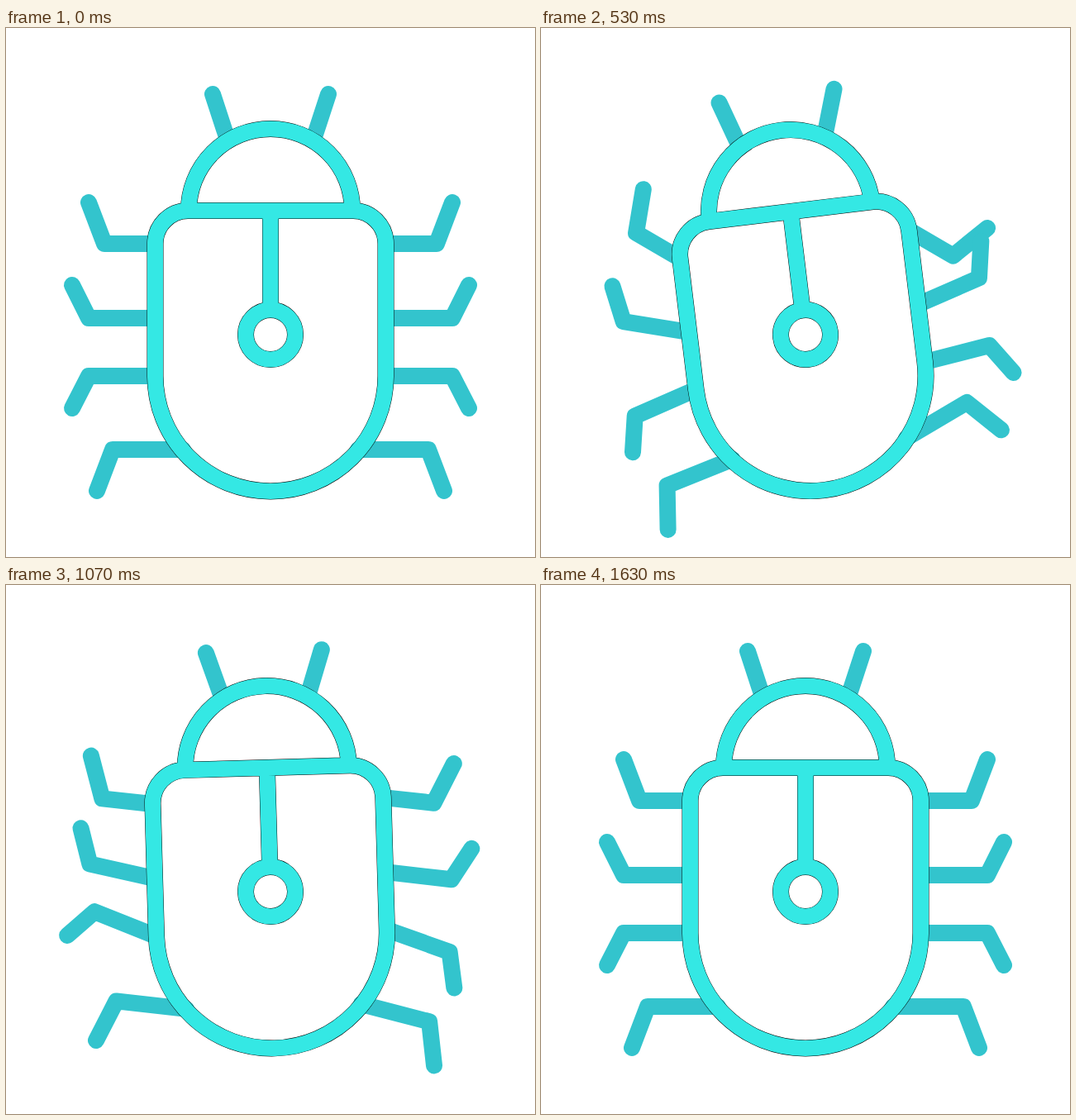
Animation of 640x640 px, one loop 1670 ms. Source, as an HTML page:

```html
<!DOCTYPE html>
<html lang="en">
<head>
<meta charset="utf-8">
<title>Wriggling bug</title>
<style>
  html, body { margin: 0; width: 100%; height: 100%; overflow: hidden; background: #fff; }
  svg { display: block; width: 100%; height: 100%; }
  path, use { fill: none; }
  .limb { stroke: #33c4cd; stroke-width: 20; stroke-linecap: round; stroke-linejoin: round; }
  .rim { stroke: #000; stroke-width: 20; }
  .shell { stroke: #34e8e4; stroke-width: 19.1; }
</style>
</head>
<body>
<svg viewBox="0 0 640 640">
  <defs>
    <path id="outline" d="M220 221H420A40 40 0 0 1 459.5 261V421A139.5 139.5 0 0 1 180.500 421V261A40 40 0 0 1 220 221Z
      M221 221A99 99 0 0 1 419 221M320 221V341M350 371A30 30 0 1 1 290 371A30 30 0 1 1 350 371Z"/>
  </defs>
  <g id="bug">
    <g id="legs"></g>
    <path class="limb" d="M250 80L268 135M390 80L372 135"/>
    <use href="#outline" class="rim"/>
    <use href="#outline" class="shell"/>
  </g>
</svg>
<script>
const LOOP = 1670, FRAME = 100 / 3, LAST = 49;

// Steps are in frames, angles in degrees.
const bodySteps = [0, 10, 12, 16, 22, 24, 32, 36, 41, 48, 49];
const bodyTurns = [0, -11.5, -12, -6.9, 9.85, 11.2, -1.6, -6, -2.25, -0.1, 0];
const legSteps = [0, 10, 16, 22, 32, 36, 41, 48, 49];
const front = [0, -18.4, 37.1, -10.6, 7.8, 37, 18.9, -4, 0];

// Hip, knee and foot of the right legs; the left ones mirror them.
const pairs = [
  { joints: [[460, 261], [521, 261], [540, 211]], right: front, left: front },
  { joints: [[460, 351], [540, 351], [560, 311]],
    right: [0, 0.2, -16.6, 16.1, 8.2, -16.6, 2.9, -7, 0],
    left: [0, -20.8, 16.2, 3.5, 14.1, 16.2, 15.3, -6.8, 0] },
  { joints: [[460, 421], [540, 421], [560, 460]],
    right: [0, -8.8, -7.4, 21, 21.3, -7.4, 11.2, -9.6, 0],
    left: [0, -4.7, -16.7, 26.6, 23.4, -16.7, 9.3, -7, 0] },
  { joints: [[426, 510], [511, 510], [530, 560]],
    right: [0, -0.2, -23.7, 32.4, 16.1, -23.7, 6.4, -10, 0],
    left: [0, 0.3, -15, 15.7, 8, -15, 2.8, -7.4, 0] }
];

// Smooth curve through the steps that never overshoots them.
function curve(xs, ys) {
  const slope = xs.slice(1).map((x, i) => (ys[i + 1] - ys[i]) / (x - xs[i]));
  const tangent = xs.map((_, i) => {
    const a = slope[i - 1], b = slope[i];
    return a * b > 0 ? 2 * a * b / (a + b) : 0;
  });
  return x => {
    let i = 0;
    while (i < xs.length - 2 && x >= xs[i + 1]) i++;
    const w = xs[i + 1] - xs[i], u = (x - xs[i]) / w, v = 1 - u;
    return ys[i] * v * v * (1 + 2 * u) + ys[i + 1] * u * u * (3 - 2 * u)
      + w * u * v * (tangent[i] * v - tangent[i + 1] * u);
  };
}

function makeLeg(joints, turns) {
  const el = document.createElementNS('http://www.w3.org/2000/svg', 'path');
  el.setAttribute('class', 'limb');
  el.setAttribute('d', 'M' + joints.join('L'));
  document.getElementById('legs').append(el);
  return { el, pivot: joints[0], turn: curve(legSteps, turns) };
}

const mirror = ([x, y]) => [640 - x, y];
const parts = pairs.flatMap(({ joints, right, left }) => [
  makeLeg(joints, right),
  makeLeg(joints.map(mirror), left)
]);
parts.push({
  el: document.getElementById('bug'),
  pivot: [320, 371],
  turn: curve(bodySteps, bodyTurns)
});

const start = performance.now();

function draw(now) {
  const t = Math.max(0, now - start) % LOOP;
  const frame = Math.min(LAST, Math.floor((t + 4) / FRAME));
  for (const { el, pivot, turn } of parts) {
    el.setAttribute('transform', `rotate(${turn(frame)} ${pivot})`);
  }
  requestAnimationFrame(draw);
}
draw(start);
</script>
</body>
</html>
```
